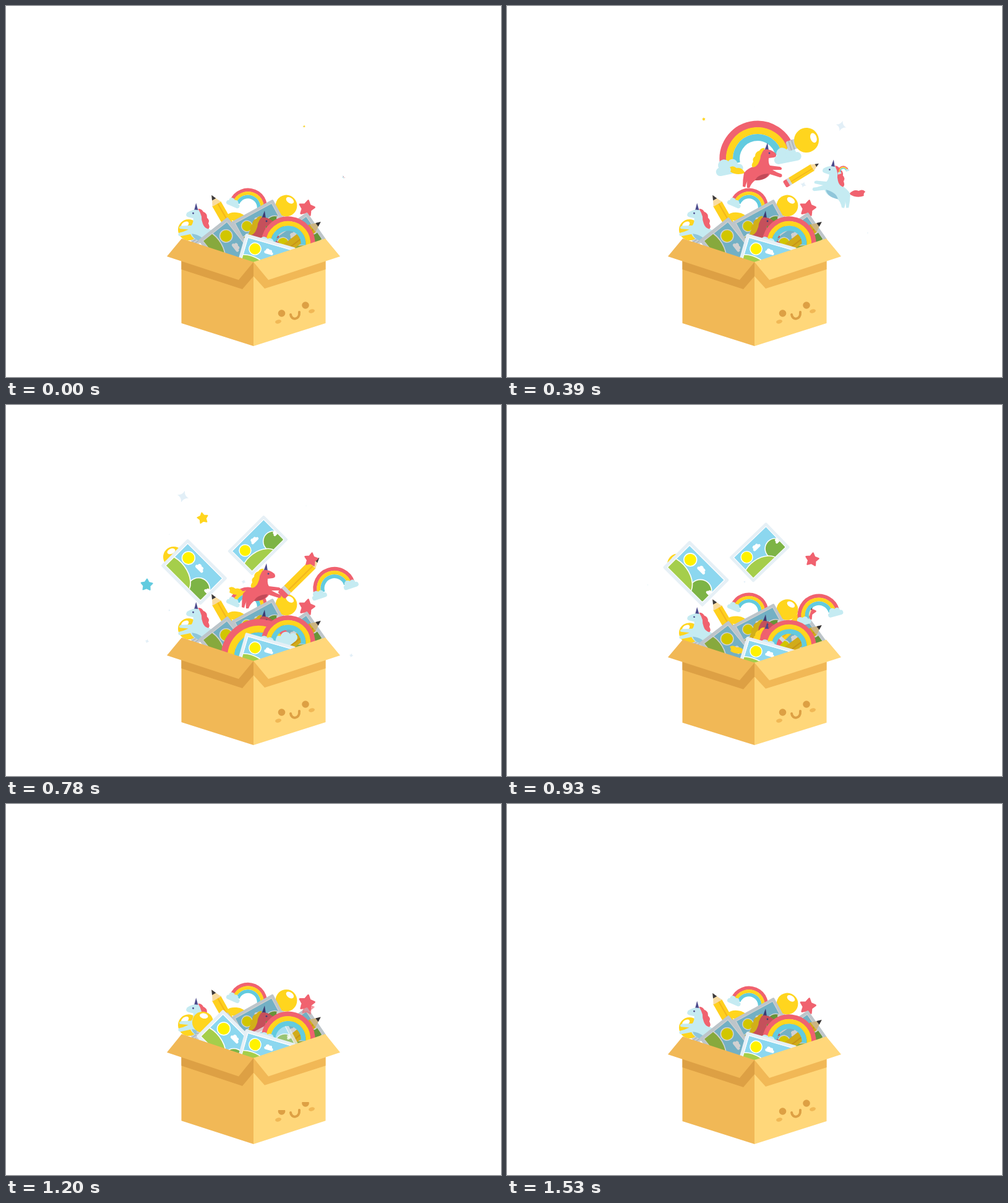
An HTML page with a canvas that plays this animation: 800x600 px, repeating every 1560 ms.

```html
<!DOCTYPE html>
<html lang="en">
<head>
<meta charset="utf-8">
<title>Box of ideas</title>
<style>
html, body { margin: 0; width: 100%; height: 100%; overflow: hidden; background: #fff; }
canvas { display: block; }
</style>
</head>
<body>
<canvas id="stage" width="800" height="600"></canvas>
<script>
const ctx = document.getElementById('stage').getContext('2d');
const LOOP = 1560, FLOOR = 550;
const RED = '#f0626f', YELLOW = '#ffd51e', BLUE = '#62cbdf', ICE = '#c5ebf2',
      SKY = '#8cd7ef', FRAME = '#e6f0f6', WHITE = '#ffffff', SPARK = '#e2eff7',
      LIGHT = '#ffd77a', MID = '#f1b856', DARK = '#dda044';

let shaded = false;
const tone = c => shaded
  ? `rgb(${c.match(/\w\w/g).map(h => Math.round(parseInt(h, 16) * .82))})` : c;
const clamp = v => Math.max(0, Math.min(1, v));
const smooth = k => k * k * (3 - 2 * k);

function fill(color, path) {
  ctx.fillStyle = tone(color);
  ctx.fill(typeof path === 'string' ? new Path2D(path) : path);
}
function oval(color, x, y, rx, ry = rx, rot = 0) {
  const p = new Path2D();
  p.ellipse(x, y, rx, ry, rot, 0, 7);
  fill(color, p);
}
function rect(color, x, y, w, h, r = 0) {
  const p = new Path2D();
  p.roundRect(x, y, w, h, r);
  fill(color, p);
}
function at(x, y, rot, sx, sy, draw) {
  ctx.save();
  ctx.translate(x, y);
  ctx.rotate(rot);
  ctx.scale(sx, sy);
  draw();
  ctx.restore();
}
const put = (draw, x, y, rot = 0, size = 1, dark = false) => {
  shaded = dark;
  at(x, y, rot, size, size, draw);
  shaded = false;
};

function cloud(x, y, s = 1, color = ICE) {
  at(x, y, 0, s, s, () => {
    rect(color, -21, -2, 42, 13, 6.5);
    oval(color, -7, -4, 9);
    oval(color, 6, -3, 8);
  });
}
function bow(left = true, right = true) {
  [[RED, 56], [YELLOW, 45.5], [BLUE, 34.5]].forEach(([color, r]) => {
    ctx.strokeStyle = tone(color);
    ctx.lineWidth = 11;
    ctx.beginPath();
    ctx.arc(0, 0, r, Math.PI, 0);
    ctx.stroke();
  });
  if (left) cloud(-48, 4, 1.06);
  if (right) cloud(48, 4, 1.06);
}
function bulb() {
  rect('#c9d0d5', -8, 15, 16, 18, 3);
  rect('#aeb7bd', -8, 22, 16, 2);
  rect('#aeb7bd', -8, 27, 16, 2);
  oval(YELLOW, 0, 0, 20);
  oval(WHITE, 0, -12, 8, 5);
}
function pencil() {
  rect(RED, -43, -8, 14, 16, 3);
  rect('#cfd6da', -34, -8, 7, 16);
  rect('#ffd01e', -28, -8, 56, 16);
  rect('#f3b51d', -28, 1, 56, 2);
  fill('#f8dba0', 'M27-8 43 0 27 8Z');
  fill('#3d3a3c', 'M36-3.6 44 0 36 3.6Z');
}
function photo() {
  rect(FRAME, -40.5, -27.5, 81, 55, 2);
  rect(WHITE, -36, -23, 72, 46);
  ctx.save();
  ctx.beginPath();
  ctx.rect(-35, -22, 70, 44);
  ctx.clip();
  rect(SKY, -35, -22, 70, 44);
  oval(WHITE, 22, 13, 17);
  oval('#7db446', 22, 13, 15.5);
  oval(WHITE, -19, 25, 33.5, 22, .15);
  oval('#a5ce4b', -19, 25, 32, 20.5, .15);
  oval(WHITE, -20, -8.5, 10);
  oval('#fff200', -20, -8.5, 8.6);
  cloud(2, -10, .34, WHITE);
  cloud(35, 6, .3, WHITE);
  ctx.restore();
}
function unicorn(coat, hair, belly) {
  fill(hair, 'M-20 8Q-26-2-34 0-40-5-45-1-42 2-44 6-34 13-20 8Z');
  fill('#4b4a8c', 'M11-28 16-41 18-28Z');
  fill(coat, 'M8-29Q18-33 29-24 32-18 26-17L18-16Q17-8 20-4L36-2Q41 0 38 3L24 3Q32 8 39 10 ' +
    '41 15 36 15L20 10Q14 20-4 20-10 24-13 32L-17 32Q-18 24-16 20-19 26-20 31L-24 30' +
    'Q-24 18-22 8-16 0-4-3 0-10 0-20 2-28 8-29Z');
  fill(belly, 'M-4 20Q0 10 18 9 14 20-4 20Z');
  fill(hair, 'M12-32Q6-33 3-28-4-26-4-19-9-16-7-10-11-5-8-1-1-2 2-9 5-15 5-20 7-26 12-32Z');
  oval('#4b4a8c', 19, -24, 1.4);
}
const redUnicorn = () => unicorn(RED, YELLOW, '#c24a58');
const blueUnicorn = () => at(0, 0, 0, -1, 1, () => unicorn(ICE, RED, '#8fc6da'));

function star(color, r) {
  const p = new Path2D();
  for (let i = 0; i < 10; i++) {
    const a = i * Math.PI / 5 - Math.PI / 2, d = i % 2 ? r * .5 : r * .9;
    p.lineTo(d * Math.cos(a), d * Math.sin(a));
  }
  p.closePath();
  ctx.strokeStyle = color;
  ctx.lineWidth = r * .2;
  ctx.lineJoin = 'round';
  ctx.stroke(p);
  fill(color, p);
}
const redStar = () => star(RED, 14);
const spark = r => at(0, 0, .3, r, r, () =>
  fill(SPARK, 'M0-1Q.18-.18 1 0 .18.18 0 1-.18.18-1 0-.18-.18 0-1Z'));

// x, y, radius, start, end
const twinkles = [
  [540, 194, 11, 250, 740], [479, 289, 5, 280, 500], [400, 163, 4.5, 375, 770],
  [583, 367, 9.5, 375, 770], [286, 148, 11.5, 510, 910], [485, 163, 4.5, 450, 800],
  [264, 209, 4.5, 450, 800], [264, 332, 11, 460, 800], [228, 382, 4.5, 510, 880],
  [558, 405, 4.5, 510, 880], [384, 286, 4, 670, 980]
];

// Each toy pops up at (x, y), then drops by (dx, dy) between fall and land.
const flyers = [
  { draw: bow, x: 405, y: 247, rot: -.2, from: 60, pop: 260, fall: 540, land: 790, dx: 4, dy: 175, turn: -.5, power: 2.3 },
  { draw: bulb, x: 484, y: 217, rot: 1.25, from: -10, pop: 250, hopX: -2, hopY: -24, fall: 420, land: 645, dx: -25, dy: 95, turn: -.6, shrink: .55, power: 2 },
  { draw: redUnicorn, x: 405, y: 262, from: 120, pop: 230, fall: 600, land: 900, dx: 0, dy: 130, power: 2.6 },
  { draw: pencil, x: 476, y: 272, rot: -.78, from: 300, pop: 170, spin: .9, fall: 690, land: 945, dx: -14, dy: 96, power: 2.7 },
  { draw: blueUnicorn, x: 535, y: 292, rot: .21, from: -10, pop: 270, hopX: 11, hopY: -16, fall: 430, land: 650, dx: -46, dy: 76, shrink: .55, power: 2 },
  { draw: bow, x: 539, y: 283, rot: -.34, size: .56, from: 365, pop: 160, hopX: 6, hopY: -21, fall: 600, land: 1020, dx: -62, dy: 101, turn: .12, power: 2.4 },
  { draw: redStar, x: 493, y: 250, rot: .15, size: .85, from: 680, pop: 100, fall: 925, land: 1130, dx: -6, dy: 80, power: 2.5 },
  { draw: bulb, x: 271, y: 246, rot: -.4, size: .85, from: 590, pop: 155, hopX: 4, fall: 800, land: 1300, dx: 73, dy: 166, turn: .9, power: 2 },
  { draw: photo, x: 407, y: 227, rot: -.785, size: 1.02, from: 510, pop: 185, spin: 1, fall: 800, land: 1150, dx: 18, dy: 160, turn: .3, power: 2.7 },
  { draw: photo, x: 304, y: 270, rot: .785, size: 1.12, from: 550, pop: 195, spin: -.35, hopX: -9, fall: 840, land: 1200, dx: 57, dy: 116, power: 2.7 }
];

function drawFlyer(f, t) {
  const fade = 1 - clamp((t - f.land - 30) / 80);
  if (t < f.from || !fade) return;
  const grown = Math.sin(clamp((t - f.from) / f.pop) * Math.PI / 2), rest = 1 - grown;
  const drop = clamp((t - f.fall) / (f.land - f.fall)) ** f.power;
  ctx.globalAlpha = fade;
  put(f.draw,
    f.x + f.dx * drop + (f.hopX || 0) * rest,
    f.y + f.dy * drop + (f.hopY || 0) * rest,
    (f.rot || 0) + (f.spin || 0) * rest + (f.turn || 0) * drop,
    (f.size || 1) * grown * (1 - (f.shrink || 0) * drop));
  ctx.globalAlpha = 1;
}

function backPile() {
  put(() => bow(), 391, 326, .4, .51);
  put(pencil, 354, 344, -2.09);
  oval(YELLOW, 372, 341, 15, 7, .1);
  put(bulb, 453, 323, .6, .87);
  put(redStar, 486, 327, .2);
  put(bulb, 295, 362, -.6, .85);
  put(blueUnicorn, 319, 361, .1);
  put(photo, 410, 354, -.5, .95, true);
  put(photo, 469, 379, -.61, 1, true);
  put(pencil, 474, 376, -.66, 1, true);
  put(redUnicorn, 402, 372, 0, 1, true);
  put(photo, 362, 395, .9, 1.1, true);
}
function frontPile() {
  put(() => bow(true, false), 456, 384, .1, .71);
  put(photo, 420, 407, .28, 1.04);
}

function box() {
  fill(MID, 'M283.5 400 400 414V550L283.5 513Z');
  fill(LIGHT, 'M400 414 516.5 400V513L400 550Z');
  fill(DARK, 'M283.5 405 400 414V437L382 458 283.5 426Z');
  fill(MID, 'M400 414 516.5 405V426L418 457 400 437Z');
  fill(MID, 'M284 376 400 414 376 443 260 405Z');
  fill(LIGHT, 'M516 376 400 414 424 443 540 405Z');
}
function face(lid) {
  [[445.5, 497], [484, 484]].forEach(([x, y]) => {
    ctx.save();
    ctx.beginPath();
    ctx.rect(x - 7, y - 6 + lid * 4, 14, 14);
    ctx.clip();
    oval(DARK, x, y, 5.8);
    ctx.restore();
  });
  oval(MID, 440, 510.5, 5, 3, -.25);
  oval(MID, 494, 493.5, 5, 3, -.25);
  ctx.strokeStyle = DARK;
  ctx.lineWidth = 4;
  ctx.lineCap = 'round';
  ctx.stroke(new Path2D('M460 499C461 509 475 508 474 495'));
  ctx.lineCap = 'butt';
}

// The box gives way under the toys, then springs back.
const squash = [[0, 1], [780, 1], [910, .98], [980, .98], [1200, 1.023], [1370, .996], [1520, 1], [LOOP, 1]];
function stretch(t) {
  const i = squash.findIndex(([time]) => time > t);
  const [t0, a] = squash[i - 1], [t1, b] = squash[i];
  return a + (b - a) * smooth((t - t0) / (t1 - t0));
}

function twinkle(draw, x, y, r, start, end, rot = 0) {
  if (t0In(start, end)) put(() => draw(r * Math.sin(Math.PI * (now - start) / (end - start))), x, y, rot);
}
let now = 0;
const t0In = (start, end) => now > start && now < end;

function render(t) {
  now = t;
  ctx.clearRect(0, 0, 800, 600);
  const s = stretch(t), pile = s < 1 ? 1 - (1 - s) * 1.75 : s;
  const onFloor = (scale, draw) => at(0, FLOOR * (1 - scale), 0, 1, scale, draw);

  onFloor(pile, backPile);
  twinkles.forEach(place => twinkle(spark, ...place));
  twinkle(r => star(YELLOW, r), 318, 183, 17, 365, 880, -.2);
  twinkle(r => star(BLUE, r), 227.5, 291, 12, 480, 935, .05);
  flyers.forEach(f => drawFlyer(f, t));
  onFloor(pile, frontPile);
  onFloor(s, box);
  face(Math.sin(Math.PI * clamp((t - 1095) / 210)));
}

const begin = performance.now();
function tick() {
  render((performance.now() - begin) % LOOP);
  requestAnimationFrame(tick);
}
tick();
</script>
</body>
</html>
```
